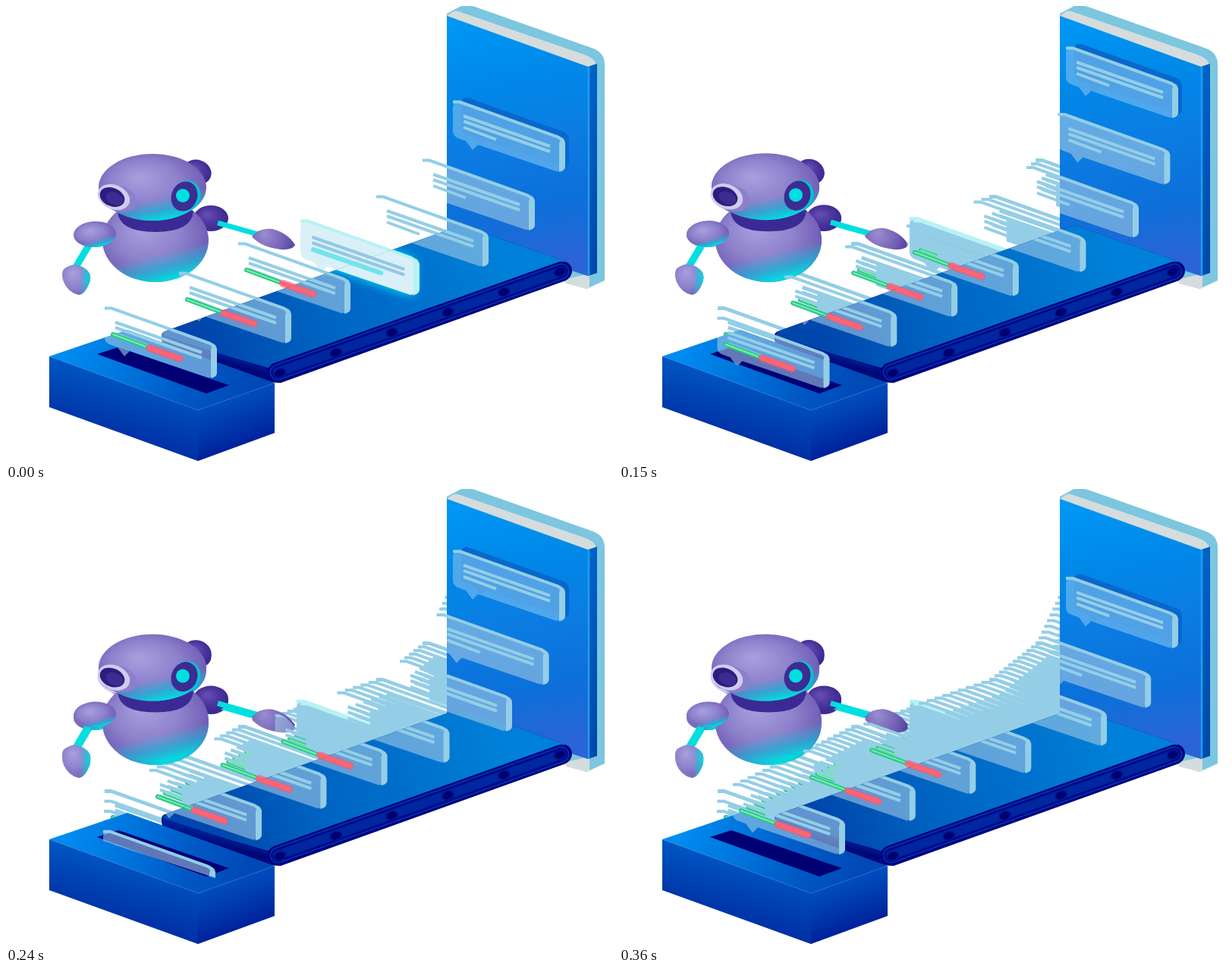
Write an HTML page with a canvas that moves like this. It is 800 px wide and 600 px high and loops after 0.39 s.

```html
<!DOCTYPE html>
<html>
<head>
<meta charset="utf-8">
<style>
html, body { margin: 0; width: 100%; height: 100%; overflow: hidden; background: #fff; }
canvas { display: block; }
</style>
</head>
<body>
<canvas id="stage" width="800" height="600"></canvas>
<script>
const ctx = document.getElementById('stage').getContext('2d');
const STEP = 30, STEPS = 13, SKY = '#94cee6', CYAN = '#00dfe0';

const shape = d => new Path2D(d);
const fill = (d, color) => { ctx.fillStyle = color; ctx.fill(shape(d)); };
function line(d, width, color, cap = 'butt') {
  ctx.lineWidth = width; ctx.strokeStyle = color; ctx.lineCap = cap;
  ctx.stroke(shape(d));
}
function gradient(x0, y0, x1, y1, ...colors) {
  const g = ctx.createLinearGradient(x0, y0, x1, y1);
  colors.forEach((c, i) => g.addColorStop(i / (colors.length - 1), c));
  return g;
}
function ellipse(x, y, rx, ry, turn, color) {
  ctx.beginPath();
  ctx.ellipse(x, y, rx, ry, turn, 0, 7);
  ctx.fillStyle = color;
  ctx.fill();
}

// Opaque scenery: cards show their glass face only in front of it
const BOX = 'M57 462L160 427L354 497V563L253 600L57 529Z';
const BELT = 'M205 436Q204 430 212 428L600 289L738 337Q747 342 746 351Q744 360 735 363L362 497L345 496L206 446Z';
const PHONE = 'M581 10L596 2Q604 -3 618 1L774 56Q789 62 789 77V362L765 373L581 308Z';
const LEFT_HAND = 'M76 347Q90 336 104 346Q113 352 111 362Q105 380 96 381Q82 378 76 364Q72 353 76 347Z';
const RIGHT_HAND = 'M324 304Q334 292 351 294Q371 299 381 315Q378 322 362 321Q336 318 324 304Z';
const solid = new Path2D();
[BOX, BELT, PHONE, RIGHT_HAND].forEach(d => solid.addPath(shape(d)));
[[193, 238, 71, 45], [197, 309, 70, 55], [252, 219, 19, 17], [270, 280, 23, 17]]
  .forEach(([x, y, rx, ry]) => {
    const part = new Path2D();
    part.ellipse(x, y, rx, ry, 0, 0, 7);
    solid.addPath(part);
  });

function drawPhone() {
  fill(PHONE, '#7cc6df');
  fill('M581 13L588 8Q592 5 599 8L762 64Q776 69 778 77L767 81Z', '#d5dcde');
  fill('M738 360L769 353V372L765 373L738 366Z', '#d5dcde');
  fill('M581 13L767 80V356L581 296Z', gradient(630, 20, 690, 345, '#0096f4', '#0088e8', '#0c7ce2', '#0c70da', '#2a64d6'));
  fill('M767 80L779 76V352L767 356Z', gradient(0, 80, 0, 350, '#0062c6', '#0048ac'));
  line('M768 80V355', 2.5, '#18a0f2');
}

function drawBelt() {
  fill(BELT, '#000a86');
  fill('M207 437Q206 431 212 428L600 289L738 337L345 477Z',
    gradient(640, 300, 270, 450, '#0080d8', '#0070cc', '#0062c0', '#0046ac'));
  fill('M207 434L345 479L343 493L207 445Z', gradient(207, 434, 203, 450, '#0028a4', '#000878'));
  const side = 'M358 483L732 350';
  line(side, 26, '#00007c', 'round');
  line(side, 21, '#0036b2', 'round');
  line(side, 18, '#000a88', 'round');
  line(side, 12, '#0026a0', 'round');
  for (let i = 0; i < 6; i++) {
    const x = 361 + i * 73.8, y = 484 - i * 26.7;
    ellipse(x, y, 9, 6.5, -.35, '#001a94');
    ellipse(x, y, 7, 5, -.35, '#000070');
  }
}

function drawBox() {
  fill('M57 462L160 427L354 497L253 533Z', gradient(85, 440, 320, 520, '#008cf0', '#0074dc', '#0058c4', '#0048b6'));
  fill('M57 462L253 533V600L57 529Z', gradient(165, 490, 145, 570, '#0056c4', '#0042b2', '#0030a6'));
  fill('M253 533L354 497V563L253 600Z', gradient(290, 515, 315, 585, '#0050c0', '#0038ac', '#001c98'));
  fill('M120 459L148 450L294 500L264 511Z', '#000074');
}

const LIGHT = ['#a8a0de', '#8e82cc', '#6652ae'], DARK = ['#6650b4', '#4c359e', '#38248c'];
function glaze(x, y, r, colors) {
  const g = ctx.createRadialGradient(x, y, 0, x + r * .15, y + r * .2, r);
  colors.forEach((c, i) => g.addColorStop(i / 2, c));
  return g;
}

function ball(x, y, rx, ry, turn, cyan = 0, colors = LIGHT) {
  ctx.save();
  ctx.translate(x, y); ctx.rotate(turn); ctx.scale(rx, ry);
  ellipse(0, 0, 1, 1, 0, glaze(-.25, -.3, 1.25, colors));
  if (cyan) ellipse(0, 0, 1, 1, 0, gradient(-.1, 1 - cyan, .1, 1, 'rgba(0,220,225,0)', 'rgba(0,205,225,.5)', CYAN));
  ctx.restore();
}

function drawRobot(dy) {
  ctx.save();
  ctx.translate(0, dy);
  ball(270, 280, 23, 17, 0, 0, DARK);
  line('M279 286L332 301', 7, CYAN);
  ball(197, 309, 70, 55, 0, .62);
  fill('M147 270Q148 298 197 298Q245 298 247 270Z', '#3b2a94');
  ball(252, 219, 19, 16, .35, 0, DARK);
  ball(193, 239, 71, 44, 0, .6);
  ellipse(149, 254, 24, 17, .3, '#8c80cc');
  ellipse(142, 252, 22, 16, .4, '#d0ccee');
  ellipse(140, 252, 17, 12, .4, '#2c1c80');
  ellipse(143, 254, 12, 8, .4, '#3c2c90');
  ellipse(238, 250, 18, 20, .4, '#00c4d4');
  ellipse(235, 251, 17, 20, .4, '#3b2d92');
  ellipse(233, 250, 9, 9, 0, CYAN);
  line('M110 314L91 346', 9, CYAN);
  ball(117, 301, 28, 17, -.05, .5);
  fill(LEFT_HAND, glaze(88, 352, 32, LIGHT));
  fill(LEFT_HAND, gradient(97, 0, 112, 0, 'rgba(0,210,220,0)', CYAN));
  fill(RIGHT_HAND, glaze(340, 300, 45, ['#9a8ed0', '#7462b6', '#3e2c92']));
  ctx.restore();
}

// Card geometry is relative to its lower right corner
const FACE = 'M-148 -85Q-147 -93 -139 -92L-13 -47Q-6 -44 -6 -36V-5Q-7 1 -12 0L-115 -35L-122 -28L-131 -40L-142 -44Q-148 -47 -148 -53Z';
const ROWS = 'M-134 -73L-20 -33M-134 -66L-20 -26M-134 -58L-91 -42';

function drawEdges(color) {
  line('M-148 -91.5L-139 -91.5L-10 -45.5Q-4 -43 -4 -36', 4, color);
  fill('M-8 -37L-8 1L-3 -1Q0 -3 0 -6V-38Q-1 -43 -5 -45Z', color);
}

function drawMarks(card) {
  if (card.glow) {
    fill(FACE, card.pale);
    drawEdges('#b8f2f4');
    line('M-132 -71L-20 -32M-132 -64L-20 -25', 4, '#94c8e2', 'round');
    line('M-132 -56L-48 -27', 6, '#72e4ec', 'round');
    return;
  }
  drawEdges(SKY);
  line(ROWS, 4, SKY);
  if (!card.bars) return;
  line('M-137 -57L-94 -41', 6, '#28c88c', 'round');
  line('M-137 -57L-94 -41', 2, '#78f0a0', 'round');
  line('M-89 -39L-49 -25', 10, 'rgba(240,90,130,.65)', 'round');
  line('M-89 -39L-49 -25', 6, '#ff6470', 'round');
}

function place(card, draw) {
  ctx.save();
  if (card.sinks) ctx.clip(shape('M0 0H400V554L125 463L0 420Z'));
  ctx.translate(card.x, card.y);
  ctx.scale(card.s || 1, card.s || 1);
  draw(card);
  ctx.restore();
}

function drawGlass(card) {
  if (card.shadow) {
    ctx.save();
    ctx.translate(11, -5);
    fill(FACE, '#0868cc');
    ctx.restore();
  }
  if (card.glow) {
    ctx.shadowColor = '#00f0ff';
    ctx.shadowBlur = 14;
    fill(FACE, card.pale);
    ctx.shadowBlur = 0;
  } else {
    fill(FACE, card.shadow ? 'rgba(105,180,238,.75)' : 'rgba(160,200,228,.6)');
  }
  drawMarks(card);
}

function cardsAt(k, now) {
  const late = Math.max(0, k - 4), early = Math.max(0, k - 3);
  const list = [];
  if (k < 4) list.push({ x: 737, y: 218, shadow: true });
  else list.push({ x: 730 - 3.6 * late, y: 227 + 7.6 * late });
  if (k > 4) list.push({ x: 737, y: 147 + 8.9 * (k - 5), shadow: true });
  list.push({ x: 697 - 6 * early, y: 295 + 4.75 * early });
  list.push({ x: 636 - 10.3 * early, y: 343 + 3.45 * early });
  if (k < 4) {
    const s = [1.06, 1.095, 1.13, 1.06][k];
    list.push({ x: 466.5 + 74 * s, y: 335 + 43 * s, s, glow: true, pale: now > 4 ? SKY : '#daf0f8' });
  } else {
    list.push({ x: 535 - 8.1 * late, y: 379 + 2.8 * late, bars: true });
  }
  list.push({ x: 454 - 7.9 * late, y: 405 + 4 * late, bars: true });
  list.push({ x: 376 - 9.75 * late, y: 444 + 4.65 * late, bars: true });
  if (k < 9) list.push({ x: 278 - .5 * late, y: 490 + 13.3 * late, bars: true, sinks: true });
  return list;
}

// Marks of earlier steps stay on the bare backdrop until the loop restarts
function drawTrails(k) {
  for (let j = 0; j <= k; j++) {
    for (const card of cardsAt(j, k)) {
      place(card, drawMarks);
      if (j > 3 && j < k && !card.sinks && !card.shadow)
        place(card, () => fill('M-115 -66L-8 -29V0L-115 -36Z', SKY));
    }
  }
}

function draw(k) {
  ctx.fillStyle = '#fff';
  ctx.fillRect(0, 0, 800, 600);
  drawTrails(k);
  drawPhone();
  drawBelt();
  drawBox();
  const lift = -Math.min(3.5, Math.max(0, k - 4) * .85);
  drawRobot(0);
  if (lift) drawRobot(lift);
  ctx.save();
  ctx.clip(solid);
  cardsAt(k, k).forEach(card => place(card, drawGlass));
  ctx.restore();
}

function tick() {
  draw(Math.floor(performance.now() / STEP) % STEPS);
  requestAnimationFrame(tick);
}
tick();
</script>
</body>
</html>
```
